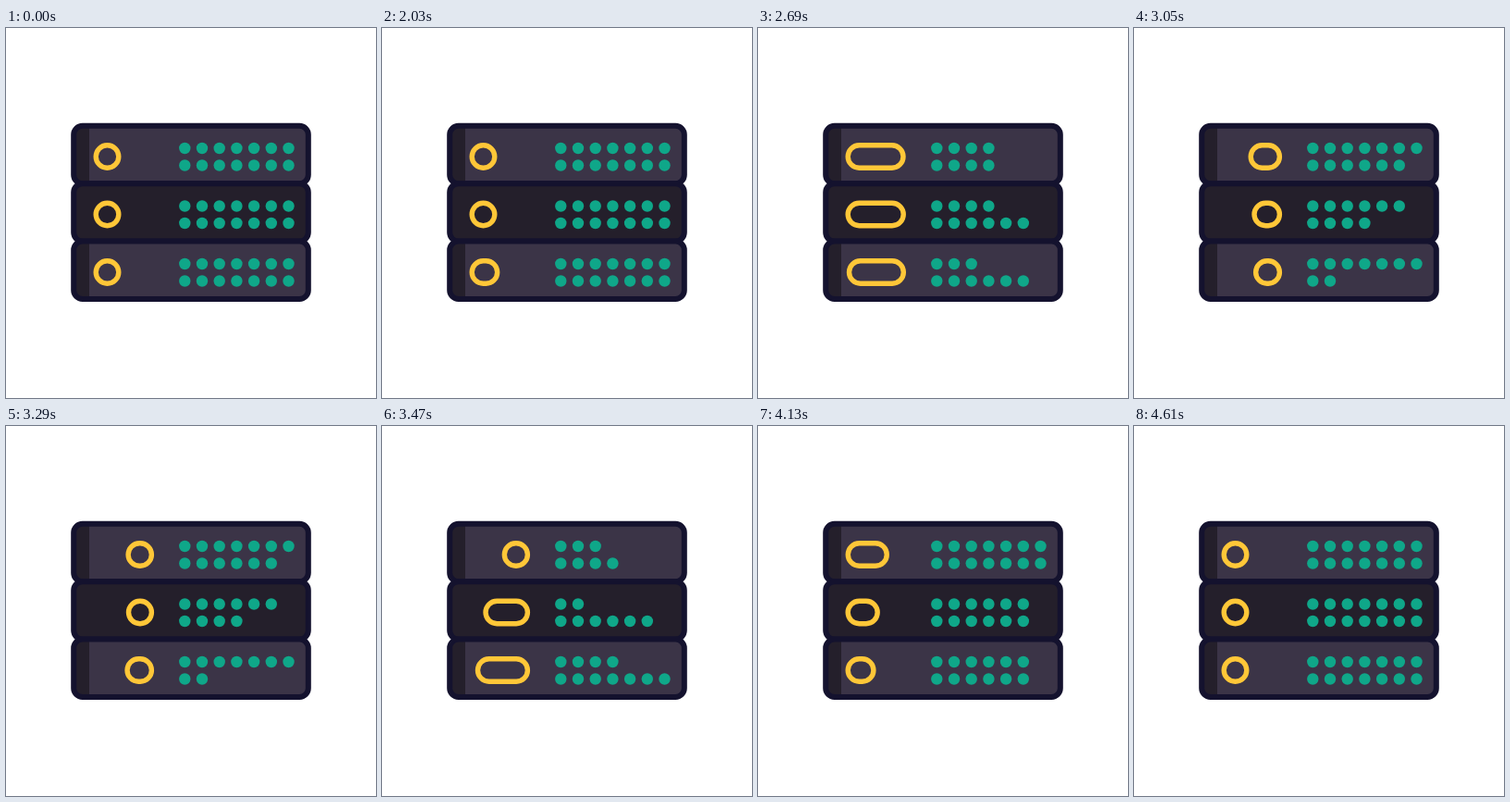
An HTML page for the animation above (4.7 s loop, 400 px wide and 400 px high).

```html
<!DOCTYPE html>
<html lang="en">
<head>
<meta charset="utf-8">
<title>Servers</title>
<style>
  html, body { margin: 0; width: 100%; height: 100%; overflow: hidden; background: #fff; }
  svg { display: block; width: 100%; height: 100%; }
  .case { stroke: #14122e; stroke-width: 6; fill: none; }
  .ring { stroke: #ffc738; stroke-width: 5.4; fill: none; }
  .dot { fill: #0fa789; }
</style>
</head>
<body>
<svg id="stage" viewBox="0 0 400 400"></svg>
<script>
const LOOP = 4700, START = 2030, END = 4610, STEP = 30;
const DARK = '#241f2b', LIGHT = '#3b3447';
const STAGES = [2021, 2686, 3285, 3870];
const RING = { left: 97.2, size: 24.6, travel: 35.6, time: 740, stagger: 92 };
const DOT_TIMES = [...STAGES, 4190], DOT_TIME = 500;
// Lit dots per row, top to bottom, after each stage
const TARGETS = [
  [4, 7, 3, 7, 7],
  [4, 6, 4, 7, 7],
  [4, 6, 2, 6, 7],
  [6, 4, 6, 6, 7],
  [3, 7, 4, 6, 7],
  [6, 2, 7, 6, 7]
];

const stage = document.getElementById('stage');

function add(tag, attrs) {
  const el = document.createElementNS('http://www.w3.org/2000/svg', tag);
  for (const key in attrs) el.setAttribute(key, attrs[key]);
  return stage.appendChild(el);
}

const rings = [], rows = [];
for (let i = 0; i < 3; i++) {
  const top = 105.8 + 62.4 * i, mid = 139 + 62.5 * i;
  const box = { x: 73.2, y: top, width: 253.6, height: 62.4, rx: 9.5 };
  add('rect', { ...box, fill: i === 1 ? DARK : LIGHT });
  if (i !== 1) {
    add('path', { d: `M90 ${top}H82.7a9.5 9.5 0 0 0-9.5 9.5v43.4a9.5 9.5 0 0 0 9.5 9.5H90z`, fill: DARK });
  }
  add('rect', { ...box, class: 'case' });
  rings.push(add('rect', {
    class: 'ring', x: RING.left, y: mid - RING.size / 2,
    width: RING.size, height: RING.size, rx: RING.size / 2
  }));
  for (const dy of [-9, 9.5]) {
    rows.push(Array.from({ length: 7 }, (_, k) =>
      add('circle', { class: 'dot', cx: 193.3 + 18.7 * k, cy: mid + dy, r: 6.2 })));
  }
}

function expoOut(x) {
  if (x <= 0) return 0;
  return x >= 1 ? 1 : 1 - 2 ** (-10 * x);
}

function drawRing(ring, i, t) {
  const delay = (2 - i) * RING.stagger;
  const [grow, close, open, shrink] = STAGES.map(s => expoOut((t - s - delay) / RING.time));
  const left = RING.travel * (close - open);
  const right = RING.travel * (grow - shrink);
  ring.setAttribute('x', RING.left + left);
  ring.setAttribute('width', RING.size + Math.max(0, right - left));
}

function drawRow(dots, targets, t) {
  let count = 7;
  DOT_TIMES.forEach((s, k) => {
    count += (targets[k] - count) * expoOut((t - s) / DOT_TIME);
  });
  const lit = Math.round(count);
  dots.forEach((dot, k) => { dot.style.display = k < lit ? '' : 'none'; });
}

function draw(ms) {
  let t = ms % LOOP;
  if (t < START || t >= END) t = 0;
  else t = START + Math.floor((t - START) / STEP) * STEP;
  rings.forEach((ring, i) => drawRing(ring, i, t));
  rows.forEach((dots, i) => drawRow(dots, TARGETS[i], t));
}

const begin = performance.now();
function tick(now) {
  draw(Math.max(0, now - begin));
  requestAnimationFrame(tick);
}
draw(0);
requestAnimationFrame(tick);
</script>
</body>
</html>
```
